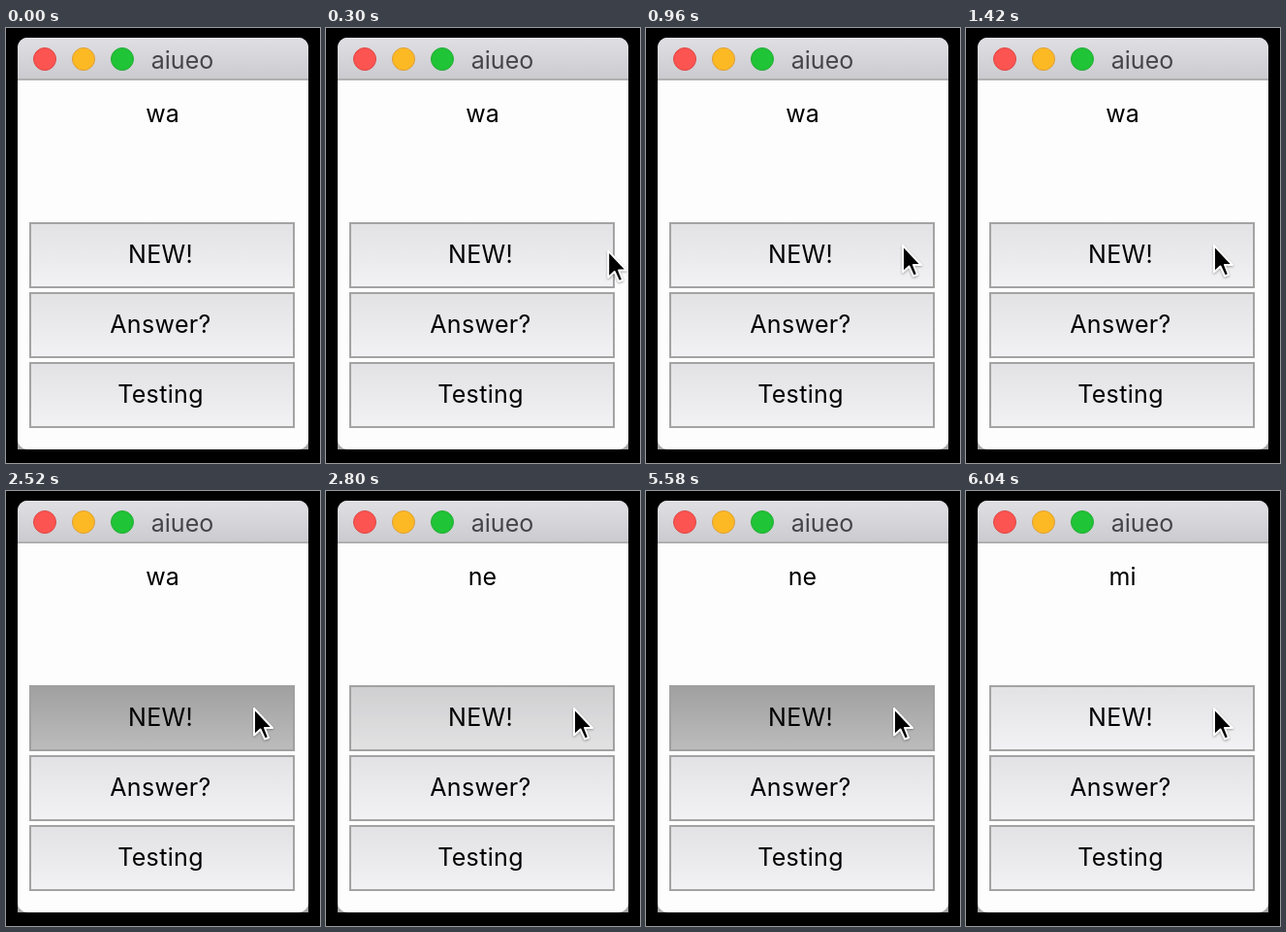
An HTML page for the animation above (8 s loop, 324 px wide and 448 px high).

```html
<!DOCTYPE html>
<html lang="en">
<head>
<meta charset="utf-8">
<title>aiueo</title>
<style>
  html, body { margin: 0; width: 100%; height: 100%; overflow: hidden; background: #000; }
  svg { display: block; width: 100vw; height: 100vh; }
  text { font: 25px Inter, Roboto, sans-serif; text-anchor: middle; }
  .title { fill: #454547; }
  .label { letter-spacing: .35px; }
  .button { fill: url(#face); stroke: #a3a3a3; stroke-width: 2; }
  .pressed { fill: url(#dark); stroke: #a0a0a0; stroke-width: 2; }
  #cursor { filter: drop-shadow(0 1px 1px #0005); }
</style>
</head>
<body>
<svg viewBox="0 0 324 448">
  <defs>
    <linearGradient id="bar" x2="0" y2="1">
      <stop stop-color="#e0e0e4"/><stop offset="1" stop-color="#cacacf"/>
    </linearGradient>
    <linearGradient id="face" x2="0" y2="1">
      <stop stop-color="#e2e2e4"/><stop offset="1" stop-color="#f2f2f4"/>
    </linearGradient>
    <linearGradient id="dark" x2="0" y2="1">
      <stop stop-color="#a0a0a0"/><stop offset="1" stop-color="#bcbcbc"/>
    </linearGradient>
    <clipPath id="frame"><rect x="12" y="10" width="300" height="424" rx="10"/></clipPath>
  </defs>
  <rect x="12" y="400" width="300" height="34" fill="#a8a8a8"/>
  <g clip-path="url(#frame)">
    <rect width="324" height="448" fill="#fdfdfd"/>
    <rect x="12" y="10" width="300" height="43" fill="url(#bar)"/>
    <rect x="12" y="52" width="300" height="2" fill="#b0b0b0"/>
  </g>
  <g stroke-width="1">
    <circle cx="40" cy="32" r="11.5" fill="#fc5450" stroke="#df4744"/>
    <circle cx="80" cy="32" r="11.5" fill="#fdb924" stroke="#de9f34"/>
    <circle cx="120" cy="32" r="11.5" fill="#1fc437" stroke="#27aa35"/>
  </g>
  <text class="title" x="182" y="42">aiueo</text>
  <text id="kana" x="161.5" y="97">wa</text>
  <g id="buttons"></g>
  <path id="cursor" d="M1 1V28.5L7.5 22.5L12 32.5L16 31L12 21H20Z"
        stroke="#fff" stroke-width="2" stroke-linejoin="round"/>
</svg>
<script>
const $ = id => document.getElementById(id);
const LOOP = 8000;
const TAP = 20;
const FADE = 400;
const taps = [
  { at: 2520, word: 'ne' },
  { at: 5580, word: 'mi' },
];
// Pointer moves: start, end, from x, to x, from y, to y
const moves = [
  [120, 580, 318, 274, 238, 223],
  [680, 860, 274, 264, 223, 223],
  [960, 1420, 264, 255, 223, 223],
];

$('buttons').innerHTML = ['NEW!', 'Answer?', 'Testing'].map((label, i) => {
  const box = `x="25" y="${201 + 72 * i}" width="272" height="66"`;
  return `<rect class="button" ${box}/>` +
    (i ? '' : `<rect id="pressed" class="pressed" ${box}/>`) +
    `<text class="label" x="159.5" y="${242 + 72 * i}">${label}</text>`;
}).join('');

const clamp = v => Math.min(1, Math.max(0, v));
const easeOut = v => 1 - (1 - v) ** 2;
const easeInOut = v => v * v * (3 - 2 * v);
const mix = (a, b, k) => a + (b - a) * k;

function draw(t) {
  const [t0, t1, x0, x1, y0, y1] = moves.findLast(m => t >= m[0]) || moves[0];
  const k = easeOut(clamp((t - t0) / (t1 - t0)));
  $('cursor').setAttribute('transform', `translate(${mix(x0, x1, k)} ${mix(y0, y1, k)})`);
  $('cursor').setAttribute('visibility', t < t0 ? 'hidden' : 'visible');

  let word = 'wa', shade = 0;
  for (const tap of taps) {
    if (t < tap.at) break;
    const released = t - tap.at - TAP;
    if (released >= 0) word = tap.word;
    shade = 1 - easeInOut(clamp(released / FADE));
  }
  $('kana').textContent = word;
  $('pressed').setAttribute('opacity', shade);
}

function tick() {
  draw(performance.now() % LOOP);
  requestAnimationFrame(tick);
}
tick();
</script>
</body>
</html>
```
